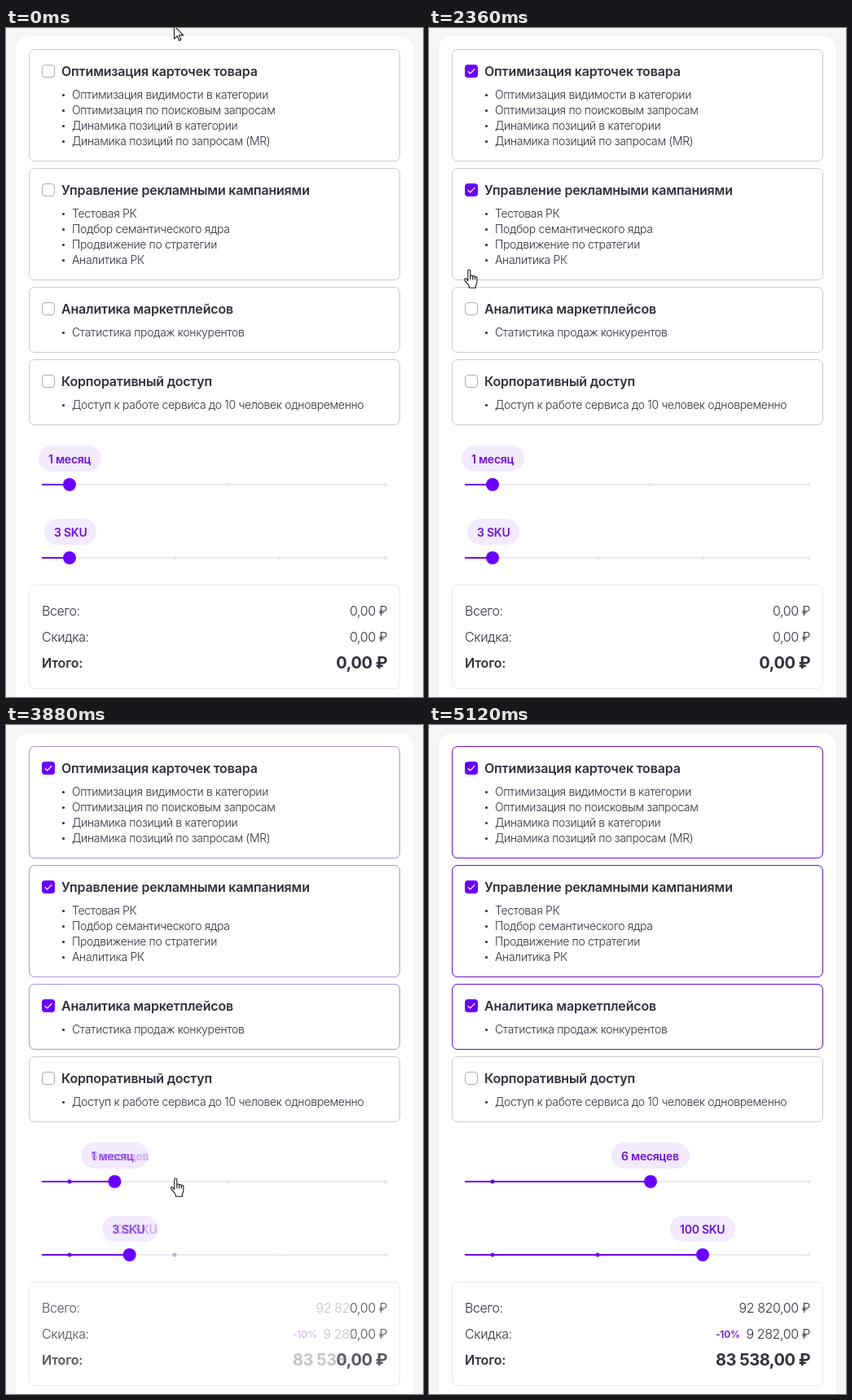
Animation, 512 px wide and 822 px high, one loop 5640 ms. Source, as an HTML page with a canvas:

```html
<!DOCTYPE html>
<html lang="ru">
<head>
<meta charset="utf-8">
<title>Калькулятор тарифа</title>
<style>
  html, body { margin: 0; width: 100%; height: 100%; overflow: hidden; background: #f5f5f6; }
  canvas { display: block; width: 512px; height: 822px; }
</style>
</head>
<body>
<canvas id="stage"></canvas>
<script>
const W = 512, H = 822, LOOP = 5640, STEP = 40;
const FONT = 'Inter, "Open Sans", sans-serif';
const INK = '#30303d', PURPLE = '#6a00ff', TAG = '#6f12d6', TRACK = '#ebebee';

// Text styles: weight, size, tracking in em
const STYLES = {
  title: [600, 16, -0.011],
  list: [350, 14, -0.024],
  label: [350, 16, -0.026],
  sum: [650, 20, -0.024],
  pill: [600, 14, -0.018],
  percent: [600, 12, -0.018]
};

const canvas = document.getElementById('stage');
const ctx = canvas.getContext('2d');
const dpr = window.devicePixelRatio || 1;
canvas.width = W * dpr;
canvas.height = H * dpr;

const cards = [
  { y: 26, h: 138, click: 840, title: 'Оптимизация карточек товара', rows: [
    'Оптимизация видимости в категории',
    'Оптимизация по поисковым запросам',
    'Динамика позиций в категории',
    'Динамика позиций по запросам (MR)'] },
  { y: 172, h: 138, click: 1800, title: 'Управление рекламными кампаниями', rows: [
    'Тестовая РК',
    'Подбор семантического ядра',
    'Продвижение по стратегии',
    'Аналитика РК'] },
  { y: 318, h: 81, click: 2920, title: 'Аналитика маркетплейсов', rows: [
    'Статистика продаж конкурентов'] },
  { y: 407, h: 81, click: Infinity, title: 'Корпоративный доступ', rows: [
    'Доступ к работе сервиса до 10 человек одновременно'] }
];

const sliders = [
  { y: 561, to: 272, stops: [78, 272, 466], from: { text: '1 месяц', x: 40, w: 77 }, end: { text: '6 месяцев', x: 224, w: 96 } },
  { y: 651, to: 336, stops: [78, 207, 336, 466], from: { text: '3 SKU', x: 47, w: 64 }, end: { text: '100 SKU', x: 296, w: 80 } }
];

// Pointer path: time, left, top
const path = [
  [0, 206, -3], [200, 206, -3], [800, 45, 55], [980, 45, 55],
  [1400, 52, 169], [1640, 47, 200], [1980, 47, 200], [2360, 43, 296],
  [2500, 40, 322], [2800, 45, 349], [3080, 45, 349], [3480, 200, 555],
  [3520, 200, 555], [3600, 202, 556], [4080, 202, 556], [4360, 488, 528],
  [4400, 530, 524], [LOOP, 530, 524]
];

const arrow = new Path2D('M.5 .5V16.3L4.2 12.8L6.7 18.5L8.9 17.5L6.4 11.9H11.6Z');
const hand = new Path2D('M4.8 14.6V2.5a1.5 1.5 0 0 1 3 0V9a1.45 1.45 0 0 1 2.8 0V9.7a1.35 1.35 0 0 1 2.7.3V10.8a1.3 1.3 0 0 1 2.6.7V16c0 2.2-1.5 3.1-1.5 5.3V23.3H6.3V21.2C5.5 19 2.9 17 .9 13.9c-.9-1.6.9-2.8 2.1-1.6Z');
const knuckles = new Path2D('M7.8 9V13.4M10.6 9.7V13.4M13.3 10.6V13.6');

const clamp = v => Math.max(0, Math.min(1, v));
const lerp = (a, b, f) => a + (b - a) * f;
const smooth = u => u * u * (3 - 2 * u);

function fade(alpha, draw) {
  if (alpha <= 0) return;
  ctx.save();
  ctx.globalAlpha *= alpha;
  draw();
  ctx.restore();
}

function box(x, y, w, h, r, fill, stroke) {
  ctx.beginPath();
  ctx.roundRect(x, y, w, h, r);
  if (fill) { ctx.fillStyle = fill; ctx.fill(); }
  if (stroke) { ctx.strokeStyle = stroke; ctx.lineWidth = 1; ctx.stroke(); }
}

function dot(x, y, r, fill) {
  ctx.beginPath();
  ctx.arc(x, y, r, 0, 7);
  ctx.fillStyle = fill;
  ctx.fill();
}

function text(str, x, y, style, align = 'left', color = INK) {
  const [weight, size, tracking] = STYLES[style];
  ctx.font = `${weight} ${size}px ${FONT}`;
  ctx.letterSpacing = `${size * tracking}px`;
  ctx.textAlign = align;
  ctx.fillStyle = color;
  ctx.fillText(str, x, y);
}

function drawCheckbox(y, t, click) {
  const p = smooth(clamp((t - click) / 180));
  box(44.5, y + .5, 15, 15, 3.5, t >= click ? '#eceaf0' : '#fff', '#a9a9b3');
  fade(p, () => {
    box(44, y, 16, 16, 4, PURPLE);
    ctx.beginPath();
    ctx.moveTo(47.7, y + 8.2);
    ctx.lineTo(50.7, y + 11);
    ctx.lineTo(56.3, y + 5.2);
    ctx.strokeStyle = '#fff';
    ctx.lineWidth = 1.2;
    ctx.stroke();
  });
}

function drawCard(card, t, f) {
  const frame = color => box(28.5, card.y + .5, 455, card.h - 1, 6.5, null, color);
  frame('#cbc9d2');
  if (card.click < LOOP) fade(f, () => frame('#6d12cc'));
  drawCheckbox(card.y + 19, t, card.click);
  text(card.title, 68, card.y + 33, 'title');
  card.rows.forEach((row, i) => {
    const y = card.y + 56 + i * 19;
    dot(70.5, y + .5, 1.6, INK);
    text(row, 81, y + 5, 'list');
  });
}

function drawSlider(s, f) {
  const x = lerp(78, s.to, f);
  ctx.fillStyle = TRACK;
  ctx.fillRect(44, s.y - 1, 423, 2);
  s.stops.forEach(p => dot(p, s.y, 2.5, TRACK));
  ctx.fillStyle = PURPLE;
  ctx.fillRect(44, s.y - 1, x - 44, 2);
  s.stops.forEach((p, i) => {
    if (p < s.to) fade(i ? f : 1, () => dot(p, s.y, 2.5, PURPLE));
  });
  dot(x, s.y, 8, PURPLE);

  const left = lerp(s.from.x, s.end.x, f);
  box(left, s.y - 48, lerp(s.from.w, s.end.w, f), 32, 16, '#f2eaff');
  const label = str => text(str, left + 12, s.y - 26, 'pill', 'left', TAG);
  fade(1 - f, () => label(s.from.text));
  fade(f, () => label(s.end.text));
}

function drawSums(total, discount, sum, percent) {
  text('Всего:', 44, 722, 'label');
  text('Скидка:', 44, 754, 'label');
  text('Итого:', 44, 786, 'title');
  text(total, 468, 722, 'label', 'right');
  text(discount, 468, 754, 'label', 'right');
  text(sum, 468, 787, 'sum', 'right');
  if (percent) text(percent, 352, 753, 'percent', 'left', TAG);
}

// Velocity at a path point; zero where the pointer rests
function slope(i, k) {
  const a = path[i - 1], b = path[i], c = path[i + 1];
  if (!a || !c || a[k] === b[k] || b[k] === c[k]) return 0;
  return (c[k] - a[k]) / (c[0] - a[0]);
}

function pointerAt(t) {
  let i = 0;
  while (i < path.length - 2 && path[i + 1][0] <= t) i++;
  const a = path[i], b = path[i + 1], d = b[0] - a[0], u = (t - a[0]) / d;
  return [1, 2].map(k =>
    lerp(a[k], b[k], smooth(u)) +
    d * u * (1 - u) * ((1 - u) * slope(i, k) - u * slope(i + 1, k)));
}

function drawPointer(t) {
  const [x, y] = pointerAt(t);
  const overCards = y > 26;
  const shape = overCards ? hand : arrow;
  ctx.save();
  ctx.translate(x, y);
  ctx.fillStyle = '#fff';
  ctx.strokeStyle = '#16161c';
  ctx.lineWidth = 1.1;
  ctx.lineJoin = 'round';
  ctx.fill(shape);
  ctx.stroke(shape);
  if (overCards) ctx.stroke(knuckles);
  ctx.restore();
}

function draw(t) {
  const f = t < 3880 ? 0 : 1 - (1 - clamp((t - 3819) / 575)) ** 3;
  ctx.setTransform(dpr, 0, 0, dpr, 0, 0);
  ctx.fillStyle = '#f5f5f6';
  ctx.fillRect(0, 0, W, H);
  box(12, 10, 488, 840, 16, '#fff');
  cards.forEach(c => drawCard(c, t, f));
  sliders.forEach(s => drawSlider(s, f));
  box(28.5, 684.5, 455, 127, 6, null, '#e9e8ed');
  fade(1 - f, () => drawSums('0,00 ₽', '0,00 ₽', '0,00 ₽'));
  fade(f, () => drawSums('92 820,00 ₽', '9 282,00 ₽', '83 538,00 ₽', '-10%'));
  drawPointer(t);
}

const start = performance.now();
function tick() {
  const t = (performance.now() - start) % LOOP;
  draw(Math.floor(t / STEP) * STEP);
  requestAnimationFrame(tick);
}
tick();
</script>
</body>
</html>
```
